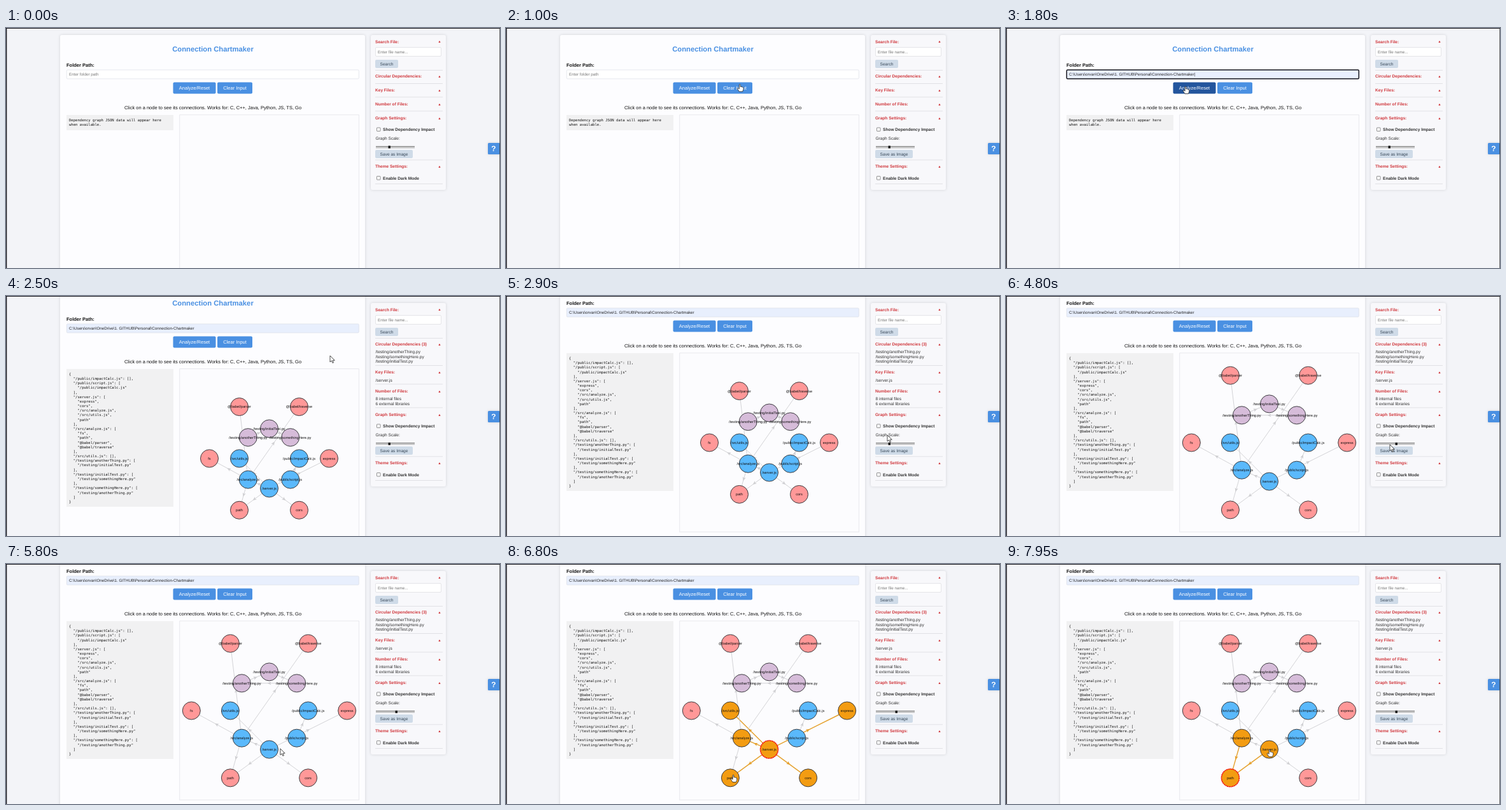
Write an HTML page that moves like this. It is 776 by 378 pixels and loops after 8 s.

```html
<!DOCTYPE html>
<html lang="en">
<head>
<meta charset="utf-8">
<style>
html, body { margin: 0; width: 100%; height: 100%; overflow: hidden; background: #f3f4f8; }
svg { display: block; width: 776px; height: 378px; }
text { font-family: "Liberation Sans", Arial, sans-serif; white-space: pre; text-rendering: geometricPrecision; }
.mono { font-family: "DejaVu Sans Mono", monospace; }
.bold { font-weight: bold; }
.mid { text-anchor: middle; }
.card { filter: drop-shadow(0 0 2px #0002); }
</style>
</head>
<body>
<svg id="stage" viewBox="0 0 776 378"></svg>
<script>
const LOOP = 8000, FILLED = 1450, DONE = 1950;
const BLUE = '#4a90e2', ORANGE = '#f39c12';
const deps = {
  '/public/impactCalc.js': [],
  '/public/script.js': ['/public/impactCalc.js'],
  '/server.js': ['express', 'cors', '/src/analyze.js', '/src/utils.js', 'path'],
  '/src/analyze.js': ['fs', 'path', '@babel/parser', '@babel/traverse'],
  '/src/utils.js': [],
  '/testing/anotherThing.py': ['/testing/initialTest.py'],
  '/testing/initialTest.py': ['/testing/somethingHere.py'],
  '/testing/somethingHere.py': ['/testing/anotherThing.py']
};

// Markup helpers: text takes the vertical middle of its line
const text = (x, y, s, size = 6.57, fill = '#333', cls = '') =>
  `<text x="${x}" y="${y + size * 0.35}" font-size="${size}" fill="${fill}" class="${cls}">${s}</text>`;
const rect = (x, y, w, h, fill, more = '') =>
  `<rect x="${x}" y="${y}" width="${w}" height="${h}" fill="${fill}" ${more}/>`;
const button = (x, y, w, h, s, size, fill, ink, id = '') =>
  rect(x, y, w, h, fill, `rx="2" ${id}`) + text(x + w / 2, y + h / 2, s, size, ink, 'mid');
const group = (id, inner) => `<g id="${id}">${inner}</g>`;

// Graph model: files on the inner ring, libraries on the outer one
const files = Object.keys(deps);
const libs = [...new Set(Object.values(deps).flat())].filter(d => !deps[d]);
const ring = (names, r, color) => names.map((name, i) => {
  const a = i / names.length * 2 * Math.PI;
  const fill = name.startsWith('/testing') ? '#d6bcd9' : color;
  return { name, fill, dx: r * Math.cos(a), dy: r * Math.sin(a) };
});
const nodes = [...ring(files, 47, '#5ab9fc'), ...ring(libs, 94, '#ff9898')];
const byName = Object.fromEntries(nodes.map(n => [n.name, n]));
const edges = files.flatMap(f => deps[f].map(d => ({ from: byName[f], to: byName[d] })));

function panel(done) {
  const shift = done ? 45 : 0, red = '#d0383d';
  const head = (y, s) => text(580, y, s, 6.57, red, 'bold') + text(681, y, '▲', 5.5, red, 'mid');
  const line = y => rect(580, y, 106, 0.8, '#dddde0');
  const list = (y, rows) => rows.map((s, i) => text(580.5, y + i * 7.5, s)).join('');
  const check = (y, s) => rect(582.5, y - 3, 5.5, 5.5, '#fff', 'rx=".6" stroke="#666" stroke-width=".7"')
    + text(592, y, s, 6.57, '#333', 'bold');
  const y = done ? [120, 150] : [98, 120];
  return rect(573, 11, 118, 244 + shift, '#f8f8fb', 'rx="3" class="card"')
    + head(21.5, 'Search File:')
    + rect(580.5, 30.5, 103, 14, '#fff', 'rx="1.5" stroke="#dcdce0" stroke-width=".7"')
    + text(584, 37.5, 'Enter file name...', 6.3, '#777')
    + button(580, 50, 36, 13, 'Search', 6.57, '#cfdbe8', '#384858')
    + line(66)
    + head(76, 'Circular Dependencies' + (done ? ' (3)' : ':'))
    + (done ? list(88, ['/testing/anotherThing.py', '/testing/somethingHere.py', '/testing/initialTest.py']) : '')
    + line(y[0] - 11) + head(y[0], 'Key Files:')
    + (done ? list(132.5, ['/server.js']) : '')
    + line(y[1] - 11.5) + head(y[1], 'Number of Files:')
    + (done ? list(162, ['8 internal files', '6 external libraries']) : '')
    + `<g transform="translate(0 ${shift})">`
    + line(130.5) + head(142, 'Graph Settings:') + check(160, 'Show Dependency Impact')
    + text(580.5, 174, 'Graph Scale:')
    + rect(581, 186, 61, 3, '#ddd') + rect(581, 186, 61, 1, '#777') + rect(581, 188.4, 61, 0.8, '#999')
    + button(580, 192, 59, 13, 'Save as Image', 6.57, '#cfdbe8', '#384858')
    + line(207.5) + head(218, 'Theme Settings:') + check(236.5, 'Enable Dark Mode') + line(245) + '</g>';
}

const json = JSON.stringify(deps, null, 2).split('\n');
const mono = (lines, y) => lines.map((s, i) => text(99, y + i * 7.18, s, 5.6, '#111', 'mono')).join('');

const page = rect(85, 11, 479, 600, '#fdfdff', 'rx="3" class="card"')
  + text(325, 33, 'Connection Chartmaker', 11.25, BLUE, 'bold mid')
  + text(95, 58.5, 'Folder Path:', 7.5, '#111', 'bold')
  + rect(95.3, 66, 459, 14, '#fff', 'id="field" rx="1.5"')
  + group('hint', text(99, 73, 'Enter folder path', 6.3, '#777'))
  + group('path', text(99, 73, 'C:\\Users\\orvan\\OneDrive\\1. GITHUB\\Personal\\Connection-Chartmaker<tspan id="caret">|</tspan>', 6.25, '#222'))
  + button(262.5, 85.5, 67, 18, 'Analyze/Reset', 7.5, BLUE, '#fff', 'id="analyze"')
  + button(332, 85.5, 55, 18, 'Clear Input', 7.5, BLUE, '#fff')
  + text(325, 125, 'Click on a node to see its connections. Works for: C, C++, Java, Python, JS, TS, Go', 7.5, '#111', 'mid')
  + rect(95, 137, 168, 24, '#f1f1f2', 'id="jsonBox"')
  + group('emptyJson', mono(['Dependency graph JSON data will appear here', 'when available.'], 145))
  + group('fullJson', mono(json, 145))
  + rect(272.8, 136.8, 281.5, 282, '#fcfcfe', 'stroke="#e3e3e8" stroke-width=".8"')
  + group('graph', '');

const stage = document.getElementById('stage');
stage.innerHTML = rect(0, 0, 776, 378, '#f3f4f8') + group('page', page)
  + group('panelEmpty', panel(false)) + group('panelFull', panel(true))
  + rect(600.5, 185.5, 3.4, 4, '#111', 'id="thumb"')
  + rect(757, 181, 19, 18, BLUE, 'rx="1.5" class="card"') + text(766, 190, '?', 12, '#fff', 'bold mid')
  + rect(0, 0, 776, 1, '#16161c') + rect(0, 0, 1.3, 378, '#16161c') + rect(775.3, 0, 0.7, 378, '#333')
  + '<path id="cursor" stroke-width=".8" stroke-linejoin="round"/>';

const $ = id => document.getElementById(id);
const set = (id, attrs) => { for (const k in attrs) $(id).setAttribute(k, attrs[k]); };
const show = (id, on) => set(id, { display: on ? 'inline' : 'none' });
const clamp = v => Math.max(0, Math.min(1, v));
const ease = v => v * v * (3 - 2 * v);
const span = (t, a, b) => clamp((t - a) / (b - a));

// Pointer stops: time, x, y
const stops = [
  [50, 640, 208], [450, 615, 142], [650, 615, 142], [1150, 300, 74], [1400, 300, 74],
  [1750, 282, 92], [1900, 282, 92], [2200, 509, 94], [2600, 509, 94], [3050, 630, 262],
  [3250, 630, 262], [3900, 601, 232], [4100, 601, 232], [4450, 613, 233], [4799, 613, 233],
  [4800, 603, 234], [5600, 446, 289], [5650, 446, 290], [6000, 408, 292], [6250, 408, 292],
  [6800, 357, 332], [7450, 357, 332], [7950, 414, 292], [8000, 414, 292]
];
const shapes = {
  arrow: 'M0 0V10L2.4 7.9 4 11.5 5.6 10.8 4.1 7.3H7.3Z',
  hand: 'M-.9 .6Q0-.6.9.6V4Q2 3.2 2.7 4.3 3.9 3.6 4.4 4.8 5.7 4.4 5.7 6V8.4L4.4 11.6H-1L-3.6 7.4Q-4 5.6-2.6 6L-.9 7.3Z',
  beam: 'M-1.5-4H1.5M0-4V4M-1.5 4H1.5'
};

function pointer(t) {
  const i = Math.max(1, stops.findIndex(s => s[0] > t));
  const [t0, x0, y0] = stops[i - 1], [t1, x1, y1] = stops[i];
  const k = ease(span(t, t0, t1));
  return [x0 + (x1 - x0) * k, y0 + (y1 - y0) * k];
}

function drawGraph(scale, selected) {
  const at = n => [413.5 + n.dx * scale, 278 + n.dy * scale];
  const lit = new Set([selected]);
  let out = '';
  for (const { from, to } of edges) {
    const on = from.name === selected || to.name === selected;
    if (on) lit.add(from.name).add(to.name);
    const [x0, y0] = at(from), [x1, y1] = at(to);
    const angle = Math.atan2(y1 - y0, x1 - x0) * 180 / Math.PI;
    const color = on ? '#e5a02c' : '#cfcfd2';
    out += `<path d="M${x0} ${y0}L${x1} ${y1}" stroke="${color}" stroke-width="${on ? 1.4 : 0.9}"/>`
      + `<path d="M-3-2.6 3 0-3 2.6-1.6 0Z" fill="${color}" transform="translate(${(x0 + x1) / 2} ${(y0 + y1) / 2}) rotate(${angle})"/>`;
  }
  for (const n of nodes) {
    const [x, y] = at(n), picked = n.name === selected;
    const line = picked ? 'stroke="#f00a0a" stroke-width="1.5" stroke-dasharray="2.2 .6"' : 'stroke="#3c3c40" stroke-width="1"';
    out += `<circle cx="${x}" cy="${y}" r="14" fill="${lit.has(n.name) ? ORANGE : n.fill}" ${line}/>`;
  }
  for (const n of nodes) {
    const [x, y] = at(n);
    out += text(x, y, n.name, 5.63, '#111', 'mid');
  }
  return out;
}

let graphKey;
function render(t) {
  const done = t >= DONE, filled = t >= FILLED, focus = t >= 1150 && t < 1850;
  const scroll = 47 * ease(span(t, 2405, 2605));
  const zoom = span(t, 4150, 4600), scale = 1 + 0.3 * zoom;
  const selected = t >= 7450 ? 'path' : t >= 6250 ? '/server.js' : null;
  const [x, y] = pointer(t);
  const py = y + scroll;

  set('page', { transform: `translate(0 ${-scroll})` });
  set('field', {
    fill: filled ? '#e8effd' : '#fff',
    stroke: focus ? '#15151c' : '#dcdfe6', 'stroke-width': focus ? 1.5 : 0.7
  });
  show('hint', !filled);
  show('path', filled);
  show('caret', focus);
  show('emptyJson', !done);
  show('fullJson', done);
  set('jsonBox', { height: done ? 217 : 24 });
  show('panelEmpty', !done);
  show('panelFull', done);
  set('thumb', {
    x: 600.5 + 11 * zoom, y: done ? 230.8 : 185.5,
    fill: t >= 3850 && t < 4650 ? '#2672d8' : '#111'
  });

  const key = done && scale + selected;
  if (key !== graphKey) {
    graphKey = key;
    $('graph').innerHTML = done ? drawGraph(scale, selected) : '';
  }

  const inBox = (x0, x1, y0, y1) => x > x0 && x < x1 && py > y0 && py < y1;
  const hover = inBox(262, 330, 85, 104);
  const onNode = done && nodes.some(n => Math.hypot(x - 413.5 - n.dx * scale, py - 278 - n.dy * scale) < 14);
  const shape = hover || inBox(332, 387, 85, 104) || onNode ? 'hand' : inBox(95, 554, 66, 80) ? 'beam' : 'arrow';
  set('analyze', { fill: hover ? '#23559d' : BLUE });
  show('cursor', t >= 50);
  set('cursor', {
    d: shapes[shape], transform: `translate(${x} ${y})`,
    fill: shape === 'beam' ? 'none' : '#fff', stroke: '#222'
  });
}

function tick() {
  render(performance.now() % LOOP);
  requestAnimationFrame(tick);
}
tick();
</script>
</body>
</html>
```
